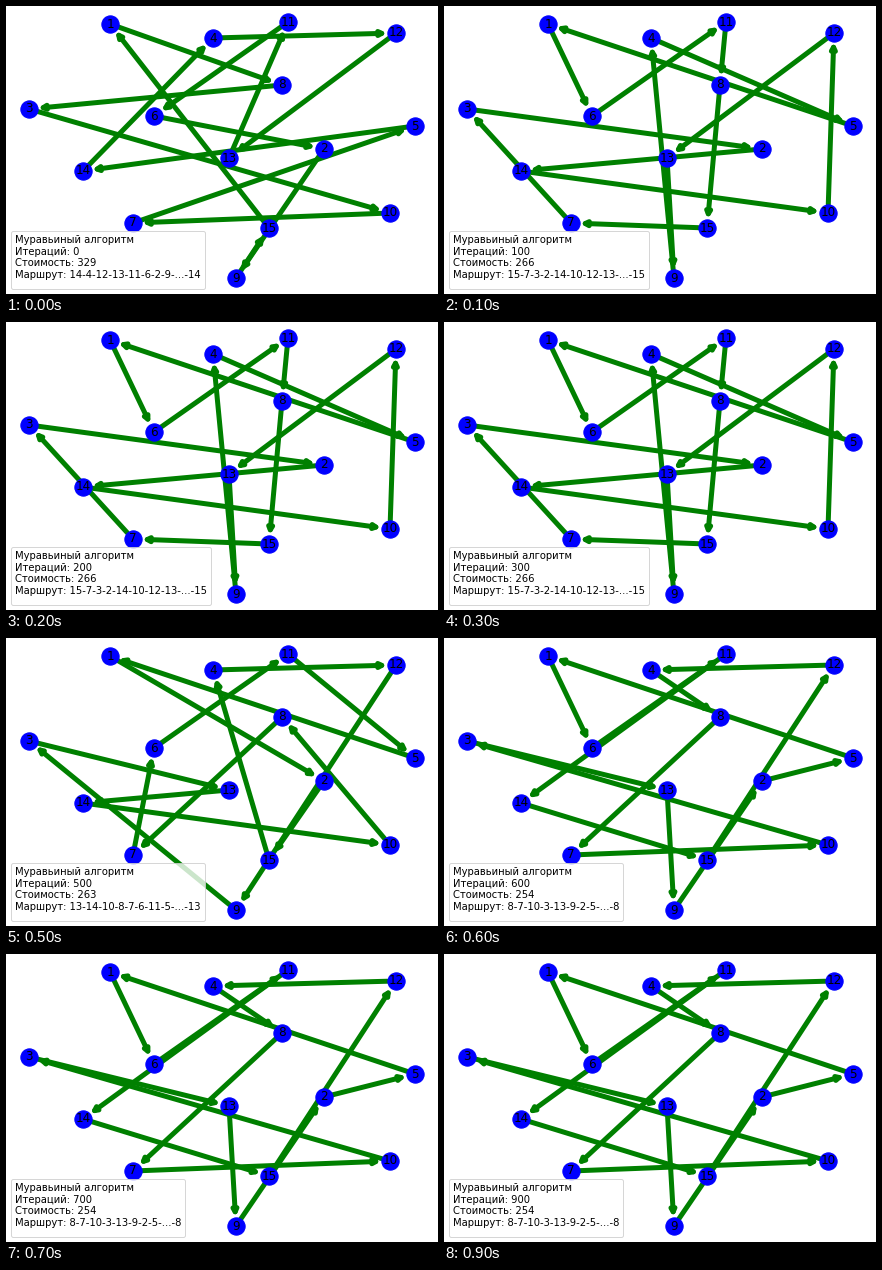
A matplotlib script that plays this animation: 432x288 px, repeating every 1 s.

```python
import matplotlib.pyplot as plt
from matplotlib.animation import FuncAnimation
from matplotlib.patches import FancyArrowPatch

W, H, DPI = 432, 288, 72
FRAMES, INTERVAL = 10, 100
STEP = 100  # iterations between frames
NODE_SIZE = 300
RADIUS = NODE_SIZE ** 0.5 / 2

POINTS = [(104, 18), (318, 143), (23, 103), (207, 32), (409, 120),
          (148, 110), (127, 217), (276, 79), (230, 272), (384, 207),
          (282, 16), (390, 27), (223, 152), (77, 165), (263, 222)]
NODES = dict(enumerate(POINTS, start=1))

# Best tour so far: first iteration -> (cost, visiting order)
BEST = {
    0: (329, [14, 4, 12, 13, 11, 6, 2, 9, 15, 1, 8, 3, 10, 7, 5]),
    100: (266, [15, 7, 3, 2, 14, 10, 12, 13, 9, 4, 5, 1, 6, 11, 8]),
    400: (263, [13, 14, 10, 8, 7, 6, 11, 5, 1, 2, 15, 4, 12, 9, 3]),
    600: (254, [8, 7, 10, 3, 13, 9, 2, 5, 1, 6, 11, 14, 15, 12, 4]),
}

plt.rcParams.update({"font.family": "DejaVu Sans", "text.kerning_factor": 6})
fig = plt.figure(figsize=(W / DPI, H / DPI), dpi=DPI, facecolor="white")
ax = fig.add_axes([0, 0, 1, 1])
ax.set(xlim=(0, W), ylim=(H, 0))
ax.axis("off")

ax.scatter(*zip(*POINTS), s=NODE_SIZE, c="blue", zorder=2)
for node, (x, y) in NODES.items():
    ax.text(x, y, str(node), fontsize=12, ha="center", va="center", zorder=3)


def draw_tour(tour):
    for start, end in zip(tour, tour[1:] + tour[:1]):
        ax.add_patch(FancyArrowPatch(
            NODES[start], NODES[end], arrowstyle="-|>", mutation_scale=10,
            shrinkA=RADIUS, shrinkB=RADIUS, color="green", linewidth=5,
            zorder=1))


def draw_summary(iteration, cost, tour):
    route = "-".join(map(str, tour[:8])) + f"-...-{tour[0]}"
    ax.legend(handles=[], loc="lower left", title=(
        "Муравьиный алгоритм\n"
        f"Итераций: {iteration}\n"
        f"Стоимость: {cost}\n"
        f"Маршрут: {route}"))


def update(frame):
    for arrow in list(ax.patches):
        arrow.remove()
    iteration = frame * STEP
    cost, tour = BEST[max(start for start in BEST if start <= iteration)]
    draw_tour(tour)
    draw_summary(iteration, cost, tour)
    return []


anim = FuncAnimation(fig, update, frames=FRAMES, interval=INTERVAL,
                     init_func=lambda: [], repeat=True, repeat_delay=0)
plt.show()
```
